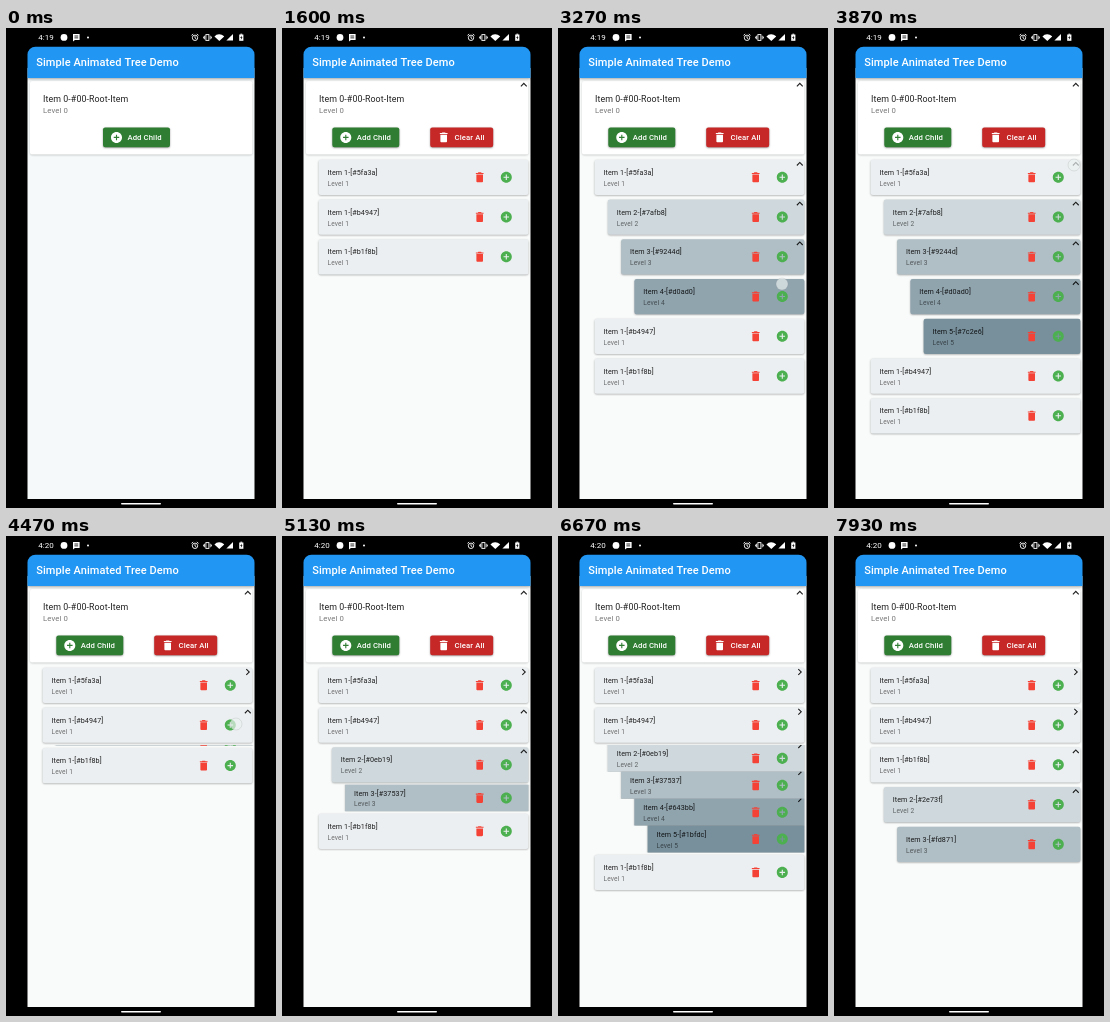
Recreate the animation shown at these times as an HTML page with a canvas. Size 270 by 480 pixels, loop 8 s.

```html
<!DOCTYPE html>
<html lang="en">
<head>
<meta charset="utf-8">
<title>Simple Animated Tree Demo</title>
<style>
  html, body { margin: 0; width: 100%; height: 100%; overflow: hidden; background: #000; }
  canvas { display: block; width: 270px; height: 480px; }
</style>
</head>
<body>
<canvas id="stage"></canvas>
<script>
const LOOP = 8000, SIZE_MS = 300, ROW = 39.75, LIST_TOP = 129.4, DP = 0.552;
const SHADES = ['#fff', '#eceff1', '#cfd8dc', '#b0bec5', '#90a4ae', '#78909c'];
const INK = 'rgba(0,0,0,.87)', FAINT = 'rgba(0,0,0,.54)';

const ICON = {
  bin: new Path2D('M6 19c0 1.1.9 2 2 2h8c1.1 0 2-.9 2-2V7H6v12zM19 4h-3.5l-1-1h-5l-1 1H5v2h14V4z'),
  add: new Path2D('M12 2C6.48 2 2 6.48 2 12s4.48 10 10 10 10-4.48 10-10S17.52 2 12 2zm5 11h-4v4h-2v-4H7v-2h4V7h2v4h4v2z'),
  up: new Path2D('M12 8l-6 6 1.41 1.41L12 10.83l4.59 4.58L18 14z'),
  right: new Path2D('M10 6L8.59 7.41 13.17 12l-4.58 4.58L10 18l6-6z')
};

// Tree in display order: id, level, time added, time folded away
const rows = [
  ['5fa3a', 1, 265],
  ['7afb8', 2, 1870, 3950],
  ['9244d', 3, 2300, 3950],
  ['d0ad0', 4, 2720, 3950],
  ['7c2e6', 5, 3330, 3950],
  ['b4947', 1, 730],
  ['0eb19', 2, 4465, 6574],
  ['37537', 3, 4930, 6574],
  ['643bb', 4, 5440, 6574],
  ['1bfdc', 5, 5970, 6574],
  ['b1f8b', 1, 1240],
  ['2e73f', 2, 7180],
  ['fd871', 3, 7615]
].map(([id, level, born, gone = Infinity]) => ({ id, level, born, gone }));

// Touches: start, end, x, y
const taps = [
  [70, 265, 128, 110], [620, 740, 83, 110], [1130, 1250, 83, 110],
  [1765, 1880, 225, 149], [2200, 2310, 225, 187], [2620, 2730, 224, 228],
  [3230, 3340, 224, 256], [3850, 3960, 240, 137], [4370, 4490, 230, 188],
  [4830, 4940, 225, 228], [5340, 5450, 224, 268], [5870, 5985, 222, 310],
  [6465, 6585, 240, 177], [7070, 7190, 224, 229], [7510, 7625, 224, 268]
];

const canvas = document.getElementById('stage');
const dpr = window.devicePixelRatio || 1;
canvas.width = 270 * dpr;
canvas.height = 480 * dpr;
const c = canvas.getContext('2d');

function rect(x, y, w, h, color) {
  c.fillStyle = color;
  c.fillRect(x, y, w, h);
}

function disc(x, y, r, color) {
  c.fillStyle = color;
  c.beginPath();
  c.arc(x, y, r, 0, 7);
  c.fill();
}

function poly(color, ...pts) {
  c.fillStyle = color;
  c.beginPath();
  for (let i = 0; i < pts.length; i += 2) c.lineTo(pts[i], pts[i + 1]);
  c.fill();
}

function text(str, x, y, size, color, weight = 400, gap = 0.08) {
  c.font = `${weight} ${size}px Roboto, sans-serif`;
  c.letterSpacing = gap + 'px';
  c.fillStyle = color;
  c.fillText(str, x, y);
}

function icon(path, x, y, color) {
  c.save();
  c.translate(x, y);
  c.scale(DP, DP);
  c.translate(-12, -12);
  c.fillStyle = color;
  c.fill(path);
  c.restore();
}

function card(x, y, w, h, color, alpha = 0.3) {
  c.save();
  c.shadowColor = `rgba(0,0,0,${alpha})`;
  c.shadowBlur = 2 * dpr;
  c.shadowOffsetY = 0.7 * dpr;
  c.fillStyle = color;
  c.beginPath();
  c.roundRect(x, y, w, h, 2.2);
  c.fill();
  c.restore();
}

function button(x, w, path, label, color) {
  card(x, 99.4, w, 19.9, color, 0.4);
  icon(path, x + 13.5, 109.4, '#fff');
  text(label, x + 24.4, 112.1, 7.73, '#fff', 500, 0.1);
}

function statusBar(t) {
  text(t < 4000 ? '4:19' : '4:20', 32.3, 12.4, 8, '#fff', 400, 0);
  disc(58, 9.4, 3.4, '#fff');
  rect(67, 6, 6.6, 6, '#fff');
  poly('#fff', 67, 11.5, 69.5, 11.5, 67, 13.4);
  rect(68.4, 7.6, 3.8, 0.8, '#000');
  rect(68.4, 9.5, 3.8, 0.8, '#000');
  disc(82, 9.6, 1, '#fff');

  c.strokeStyle = '#fff';
  c.lineWidth = 0.9;
  c.beginPath();
  c.arc(189, 9.8, 2.7, 0, 7);
  c.moveTo(189, 8.2); c.lineTo(189, 10); c.lineTo(190.3, 10.8);
  c.moveTo(185.5, 7.4); c.lineTo(187.2, 6);
  c.moveTo(192.5, 7.4); c.lineTo(190.8, 6);
  c.stroke();
  c.strokeRect(199.9, 6.6, 3, 5.8);
  for (const s of [-1, 1]) {
    rect(201.4 + s * 2.8 - 0.4, 7.7, 0.8, 3.6, '#fff');
    rect(201.4 + s * 4 - 0.4, 8.6, 0.8, 1.8, '#fff');
  }
  c.fillStyle = '#fff';
  c.beginPath();
  c.moveTo(213.3, 12.9);
  c.arc(213.3, 12.9, 6.6, -2.4, -0.74);
  c.fill();
  poly('#fff', 220.4, 12.6, 227, 12.6, 227, 6);
  rect(233.2, 6.5, 4.2, 6.3, '#fff');
  rect(234.4, 5.7, 1.8, 1, '#fff');
  poly('#000', 235.8, 7.4, 234.2, 9.9, 235.2, 9.9, 234.8, 12, 236.5, 9.2, 235.5, 9.2);
}

function header(t) {
  card(24, 53, 222.4, 73.6, '#fff', 0.22);
  c.save();
  c.shadowColor = 'rgba(0,0,0,.35)';
  c.shadowBlur = 3 * dpr;
  c.shadowOffsetY = dpr;
  c.fillStyle = '#2196f3';
  c.beginPath();
  c.roundRect(21.5, 18.7, 227, 31.3, [8, 8, 0, 0]);
  c.fill();
  c.restore();
  text('Simple Animated Tree Demo', 30.2, 38.4, 11.04, '#fff', 500);

  text('Item 0-#00-Root-Item', 37, 74.2, 8.83, INK);
  text('Level 0', 37, 85.2, 7.73, FAINT, 400, 0.12);
  if (t < rows[0].born) {
    button(97, 67, ICON.add, 'Add Child', '#2e7d32');
  } else {
    button(50.3, 67, ICON.add, 'Add Child', '#2e7d32');
    button(148.2, 63, ICON.bin, 'Clear All', '#c62828');
    icon(ICON.up, 241.8, 56.8, INK);
  }
}

function extent(row, t) {
  const grow = Math.min(1, Math.max(0, (t - row.born) / SIZE_MS));
  const shrink = Math.min(1, Math.max(0, (t - row.gone) / SIZE_MS));
  return grow * (1 - shrink);
}

function drawRow(i, y, t) {
  const { id, level } = rows[i], next = rows[i + 1];
  const x = 36.6 + (level - 1) * 13.25;
  card(x, y + 2.4, 246.4 - x, 35.2, SHADES[level]);
  text(`Item ${level}-[#${id}]`, x + 8.9, y + 17.5, 7.18, INK);
  text('Level ' + level, x + 8.9, y + 28.4, 6.62, FAINT, 400, 0.12);
  icon(ICON.bin, 197.7, y + 19.9, '#f44336');
  icon(ICON.add, 224.3, y + 19.9, '#4caf50');
  if (next && next.level > level && t >= next.born)
    icon(t < next.gone ? ICON.up : ICON.right, 241.8, y + 6.6, INK);
}

function list(t) {
  let y = LIST_TOP;
  rows.forEach((row, i) => {
    const h = ROW * extent(row, t);
    if (!h) return;
    c.save();
    c.beginPath();
    c.rect(21.5, y, 227, h);
    c.clip();
    drawRow(i, y - (ROW - h) / 2, t);
    c.restore();
    y += h;
  });
}

function touch(t) {
  for (const [from, to, x, y] of taps) {
    if (t < from || t >= to) continue;
    disc(x, y, 6, 'rgba(235,240,240,.68)');
    c.strokeStyle = 'rgba(120,130,130,.25)';
    c.lineWidth = 0.7;
    c.stroke();
  }
}

function draw(now) {
  const t = now % LOOP;
  c.setTransform(dpr, 0, 0, dpr, 0, 0);
  rect(0, 0, 270, 480, '#000');
  statusBar(t);
  rect(21.5, 40, 227, 431, t < 1130 ? '#f5f9f9' : '#f9fbfa');
  header(t);
  list(t);
  touch(t);
  c.fillStyle = '#fff';
  c.beginPath();
  c.roundRect(115, 475, 40, 1.6, 0.8);
  c.fill();
}

const start = performance.now();
function tick() {
  draw(performance.now() - start);
  requestAnimationFrame(tick);
}
tick();
</script>
</body>
</html>
```
